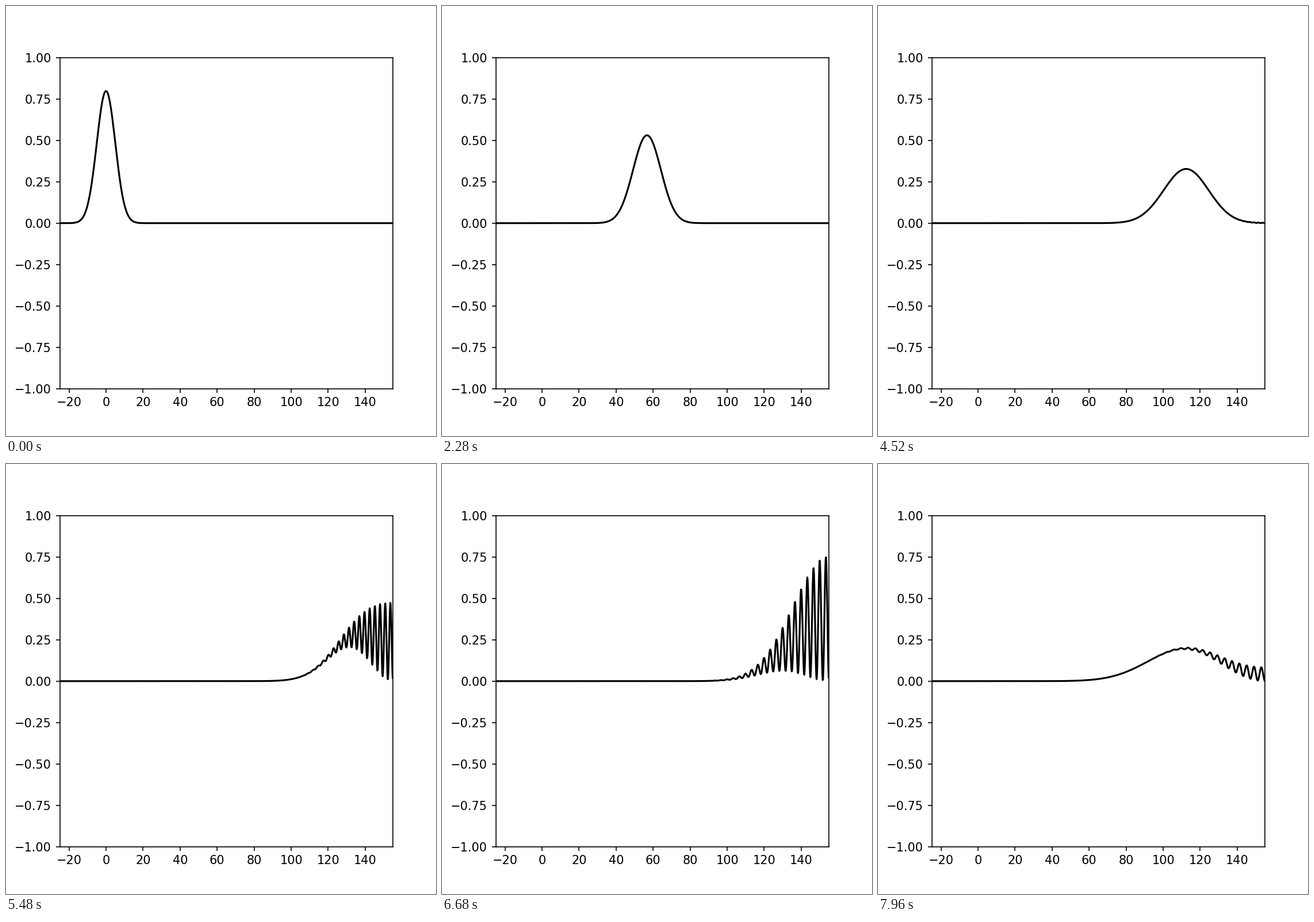
Animation, 748 px wide and 748 px high, one loop 8000 ms. Source, as a matplotlib script:

```python
import numpy as np
import matplotlib.pyplot as plt
from matplotlib.animation import FuncAnimation

# Gaussian wave packet on a lattice between two hard walls (hbar = m = 1)
N, FRAMES = 1000, 200
X0, X1 = -25, 155
SIGMA, K0 = 5, 1
dx = (X1 - X0) / N
x = X0 + dx * np.arange(N)

# Sine modes diagonalise the finite-difference Hamiltonian
n = np.arange(1, N + 1)
theta = np.pi * n / (N + 1)
modes = np.sqrt(2 / (N + 1)) * np.sin(np.outer(n, theta))
energy = (1 - np.cos(theta)) / dx**2

peak = np.sqrt(2 / np.pi)
psi0 = np.sqrt(peak) * np.exp(-x**2 / (4 * SIGMA**2) + 1j * K0 * x)
coeffs = modes.T @ psi0


def density(t):
    return np.abs(modes @ (coeffs * np.exp(-1j * energy * t)))**2


fig = plt.figure(figsize=(4.98667, 4.98667), dpi=150)
ax = fig.add_axes([0.125, 0.11, 0.775, 0.77])
ax.set_xlim(X0, X1)
ax.set_ylim(-1, 1)
ax.set_xticks(range(-20, 141, 20))
ax.set_yticks(np.linspace(-1, 1, 9))
line, = ax.plot(x, density(0), color="black", lw=1.5)


def update(i):
    line.set_ydata(density(i))
    return line,


anim = FuncAnimation(fig, update, frames=FRAMES, interval=40,
                     repeat=True, repeat_delay=0)
plt.show()
```
